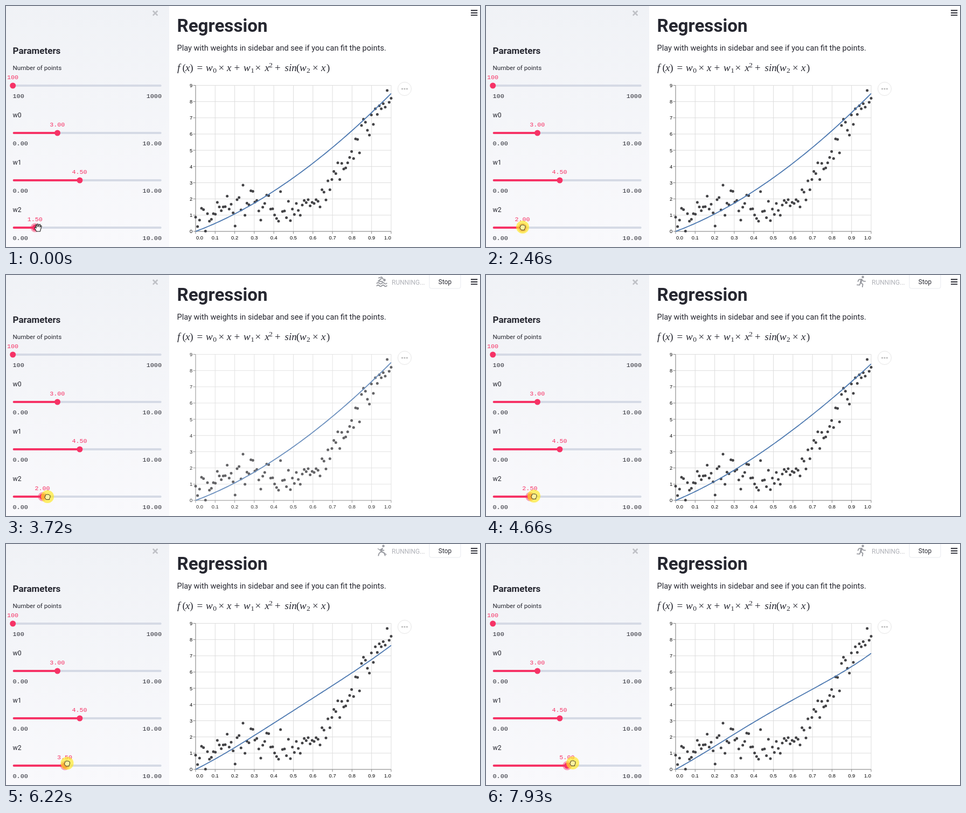
These frames come from a looping animation (880x448 px, 8000 ms). An HTML page:

```html
<!DOCTYPE html>
<html lang="en">
<head>
<meta charset="utf-8">
<title>Regression</title>
<style>
  html, body { margin: 0; width: 100%; height: 100%; overflow: hidden; background: #fff; }
  svg { display: block; width: 880px; height: 448px; }
  text { font-family: Roboto, sans-serif; fill: #262730; }
  .mono { font: 11.8px "Liberation Mono", monospace; }
  .value { font: 11.7px "Liberation Mono", monospace; fill: #f63366; text-anchor: middle; }
  .axis text { font: 9.4px "Liberation Sans", sans-serif; fill: #000; }
  .math text { font: italic 19px "Liberation Serif", serif; }
  .math .up { font-style: normal; }
  .math .small { font: 13.5px "Liberation Serif", serif; }
  .icon { fill: none; stroke: #999ba1; stroke-width: 1.9; stroke-linecap: round; stroke-linejoin: round; }
  .icon .head { fill: #999ba1; stroke: none; }
</style>
</head>
<body>
<svg id="stage" viewBox="0 0 880 448" xmlns="http://www.w3.org/2000/svg">
  <defs>
    <linearGradient id="side" x2="0" y2="1">
      <stop offset="0" stop-color="#f0f2f6"/>
      <stop offset="1" stop-color="#f9f9fc"/>
    </linearGradient>
  </defs>
  <rect width="880" height="448" fill="#fff"/>
  <rect width="303" height="448" fill="url(#side)"/>
  <path d="M272.8 9l8.6 8.6M281.4 9l-8.6 8.6" stroke="#bfc1c6" stroke-width="2.6"/>
  <text x="12.5" y="89" font-size="17" font-weight="700">Parameters</text>

  <text x="317.5" y="47.5" font-size="33.2" font-weight="700">Regression</text>
  <text x="317.5" y="83.3" font-size="14.57">Play with weights in sidebar and see if you can fit the points.</text>
  <g class="math" id="math"></g>
  <g id="chart">
    <g class="axis" id="axis"></g>
    <g id="dots" fill="#434346"></g>
    <path id="curve" fill="none" stroke="#4c78b0" stroke-width="1.8"/>
  </g>
  <circle cx="740" cy="154" r="12.5" fill="#fff" stroke="#e6e6e6"/>
  <g fill="#bbb"><circle cx="735.6" cy="154" r="1.6"/><circle cx="740" cy="154" r="1.6"/><circle cx="744.4" cy="154" r="1.6"/></g>
  <path d="M863 8.3h12.3M863 12.7h12.3M863 17.1h12.3" stroke="#262730" stroke-width="1.9"/>

  <g id="status">
    <g class="icon" id="run">
      <circle class="head" cx="699.6" cy="3.8" r="2.3"/>
      <path d="M697.5 8L695.6 14.2L699.6 17.3L698.8 22M695.2 14.6L693.6 18.6L689 18.4M690.6 11.8L692.4 8.4L697.5 8L700.4 11.4L704 11.8"/>
      <path d="M697 9L695.8 13.6" stroke-width="3.4"/>
    </g>
    <g class="icon" id="bike">
      <circle cx="691.6" cy="17.6" r="3.6"/><circle cx="703" cy="17.6" r="3.6"/>
      <circle class="head" cx="700.6" cy="4" r="2.2"/>
      <path d="M703.5 11H700L697.5 7.6L693.5 11.2L697.5 14V18.4"/>
    </g>
    <g class="icon" id="row">
      <circle class="head" cx="700.6" cy="3.8" r="2.3"/>
      <path d="M699 8.2L696 14.4L701.8 16.2L703.8 21.4M696 14.4L692.6 17.6L691.4 21.6M699 8.4L694.2 11L701.4 11.8"/>
      <path d="M690.5 8.8L706 19.6" stroke-width="1.4"/>
    </g>
    <g class="icon" id="swim">
      <circle class="head" cx="702.6" cy="9.4" r="2.3"/>
      <path d="M692 5.4L697.4 3.8L700 7.4M697 6.4L691 11.4L699 12.2" />
      <path id="wave" d="M688.5 15.4q2.3 -2.4 4.6 0t4.6 0t4.6 0t4.6 0M688.5 20q2.3 -2.4 4.6 0t4.6 0t4.6 0t4.6 0"/>
    </g>
    <text x="716" y="18" font-size="12" style="fill:#b1b3b9">RUNNING...</text>
    <path d="M786 0V21.5q0 3.5 3.5 3.5H840.5q3.5 0 3.5 -3.5V0" fill="#fff" stroke="#e8eaef"/>
    <text x="815" y="17" font-size="11.9" text-anchor="middle">Stop</text>
  </g>

  <g id="sliders"></g>
  <g id="pointer">
    <circle id="glow" r="12" fill="#ffe81f" opacity=".66"/>
    <path id="open" fill="#fff" stroke="#1c1c1c" stroke-width="1.1" stroke-linejoin="round"
      d="M-3 7L-6 1.5Q-7 -.5 -5.3 -.8Q-4 -.6 -3.2 1L-4.6 -4Q-4.6 -5.8 -3.1 -5.4L-1.5 -1.4L-1.6 -6Q-1 -7.7 .4 -6.3L1 -1.6L2.3 -5.8Q3.8 -6.8 4.4 -5.2L3.6 -.8L5.2 -3.4Q6.8 -3.8 6.6 -2.2L4.6 4.2L4 7Z"/>
    <path id="fist" fill="#fff3a0" stroke="#33301c" stroke-width="1" stroke-linejoin="round"
      d="M-2.6 5.4L-5 1.6Q-5.6 -.4 -3.9 -.6L-3.9 -2.8Q-3.2 -4.6 -1.6 -3.6Q-.4 -5 1 -3.7Q2.6 -4.6 3.5 -2.9Q5.2 -3 5 -1.2L4.8 1.6L3.6 3.6V5.4Z"/>
  </g>
</svg>
<script>
const LOOP = 8000, LEFT = 352, RIGHT = 715, BASE = 419, TOP = 147.5;
const X0 = 12.7, TRACK = 276;
const $ = id => document.getElementById(id);
const px = x => LEFT + (RIGHT - LEFT) * x;
const py = y => BASE - (BASE - TOP) / 9 * y;

function add(parent, tag, attrs, text) {
  const el = document.createElementNS("http://www.w3.org/2000/svg", tag);
  for (const k in attrs) el.setAttribute(k, attrs[k]);
  if (text !== undefined) el.textContent = text;
  return parent.appendChild(el);
}

// Formula
[[318, "f"], [333, "x"], [371, "w"], [410, "x"], [441, "w"], [480.5, "x"],
 [517.5, "sin"], [545, "w"], [585, "x"]].forEach(([x, s]) => add($("math"), "text", { x, y: 121.3 }, s));
[[327.5, "("], [341.3, ")"], [354.5, "="], [394.5, "×"], [423.5, "+"], [462.5, "×"],
 [499, "+"], [539, "("], [569, "×"], [595, ")"]].forEach(([x, s]) => add($("math"), "text", { x, y: 121.3, class: "up" }, s));
[[384.3, 124, "0"], [454.3, 124, "1"], [488.3, 113.5, "2"], [558, 124, "2"]]
  .forEach(([x, y, s]) => add($("math"), "text", { x, y, class: "small" }, s));

// Chart
const axis = $("axis");
let grid = "", ticks = "";
for (let i = 0; i <= 10; i++) {
  const x = px(i / 10);
  grid += `M${x} ${TOP}V${BASE}`;
  ticks += `M${x} ${BASE}v4.5`;
  const end = i === 0 ? "start" : i === 10 ? "end" : "middle";
  add(axis, "text", { x: i ? x : x + 1, y: 433.5, "text-anchor": end }, (i / 10).toFixed(1));
}
for (let i = 0; i <= 9; i++) {
  const y = py(i);
  grid += `M${LEFT} ${y}H${RIGHT}`;
  ticks += `M${LEFT} ${y}h-4.5`;
  add(axis, "text", { x: 346.3, y: y + 3.4, "text-anchor": "end" }, i);
}
add(axis, "path", { d: grid, stroke: "#ddd" });
add(axis, "path", { d: `${ticks}M${LEFT} ${TOP}V${BASE}H${RIGHT}`, stroke: "#888", fill: "none" });

const ys = [392.5, 410, 398, 376, 378.5, 418.5, 386, 400, 396.5, 386, 387, 365, 373.5, 380.5, 373.5, 373, 353.5, 377.5, 368.5, 384.5,
  409, 360, 356, 379, 333, 389, 366.5, 369.5, 343.5, 344.5, 364.5, 361.5, 381, 398, 374, 367, 351.5, 352.5, 377.5, 377,
  388.5, 395, 400, 345, 382, 381, 393.5, 363, 399, 377.5, 387.5, 367, 380, 389, 370, 361.5, 365.5, 360, 371.5, 365,
  367, 360, 363, 373.5, 341.5, 346, 360.5, 325, 341.5, 322.5, 307.5, 311.5, 291.5, 322.5, 292.5, 303, 301, 291.5, 281.5, 270.5,
  283.5, 247, 248, 273, 222, 210.5, 216, 231, 240, 202.5, 220, 191, 201.5, 185.5, 191, 181.5, 188, 157, 179, 171.5];
ys.forEach((cy, i) => add($("dots"), "circle", { cx: px(i / 99), cy, r: 2.5 }));

function curve(w2) {
  let d = "";
  for (let i = 0; i < 100; i++) {
    const x = i / 99;
    d += (i ? "L" : "M") + px(x).toFixed(2) + " " + py(3 * x + 4.5 * x * x + Math.sin(w2 * x)).toFixed(2);
  }
  return d;
}

// Sliders
function slider(row, name, min, max, size) {
  const y = 148 + 88 * row, g = $("sliders");
  add(g, "text", { x: 12.5, y: y - 29, "font-size": size }, name);
  add(g, "text", { x: 12.5, y: y + 23, class: "mono" }, min);
  add(g, "text", { x: 289, y: y + 23, class: "mono", "text-anchor": "end" }, max);
  add(g, "rect", { x: X0, y: y - 2, width: TRACK, height: 4, rx: 2, fill: "#d5dae5" });
  const bar = add(g, "rect", { x: X0, y: y - 2, height: 4, rx: 2, fill: "#f63366" });
  const halo = add(g, "circle", { cy: y, r: 8.6, fill: "#f63366", opacity: 0 });
  const knob = add(g, "circle", { cy: y, r: 5.5, fill: "#f63366" });
  const label = add(g, "text", { y: y - 12, class: "value" });
  return (part, text, glow = 0) => {
    const x = X0 + TRACK * part;
    bar.setAttribute("width", x - X0);
    [halo, knob].forEach(c => c.setAttribute("cx", x));
    halo.setAttribute("opacity", glow);
    label.setAttribute("x", x - .3);
    label.textContent = text;
  };
}
slider(0, "Number of points", "100", "1000", 11.7)(0, "100");
slider(1, "w0", "0.00", "10.00", 12.3)(.3, "3.00");
slider(2, "w1", "0.00", "10.00", 12.3)(.45, "4.50");
const setW2 = slider(3, "w2", "0.00", "10.00", 12.3);

// Timelines: [time, value...]
const values = [[0, 1.5], [2460, 2], [3900, 2.5], [5140, 3], [6160, 3.5], [7630, 4.5], [7850, 5]];
const fits = [[0, 1.5], [3960, 2], [5210, 2.5], [6180, 3], [7690, 3.5]];
const fades = [[3170, 3960], [4560, 5210], [5920, 6180], [6910, 7690]];
const path = [[0, 59.5, 412], [120, 58, 411.5], [220, 56, 411], [430, 55, 410.5], [980, 55, 410], [1130, 57, 410], [1440, 57, 410],
  [1460, 59.5, 410], [1620, 62, 410], [1750, 62, 410], [1830, 65, 410], [1990, 65, 410], [2010, 66, 410], [2440, 66, 410],
  [2460, 68, 411], [3170, 68, 411], [3720, 77, 412], [3960, 84, 412], [4330, 87, 411], [4660, 89, 411], [5210, 98, 410],
  [5860, 98, 410], [6220, 113.5, 407.5], [6680, 119, 407], [7070, 119.5, 407], [7690, 148, 407], [7930, 161, 407]];

const step = (list, t) => list.filter(k => k[0] <= t).pop()[1];
function along(t) {
  const i = path.findIndex(k => k[0] > t);
  if (i < 0) return path[path.length - 1].slice(1);
  const a = path[i - 1], b = path[i], p = (t - a[0]) / (b[0] - a[0]);
  return [1, 2].map(n => a[n] + (b[n] - a[n]) * p);
}
const show = (id, on) => $(id).setAttribute("visibility", on ? "visible" : "hidden");

let lastFit;
function draw(t) {
  const w2 = step(values, t), fit = step(fits, t), held = t >= 980;
  setW2(w2 / 10, w2.toFixed(2), .45);

  if (fit !== lastFit) $("curve").setAttribute("d", curve(lastFit = fit));
  const fade = fades.find(([a, b]) => t >= a && t < b);
  $("chart").setAttribute("opacity", fade ? 1 - .6 * ((t - fade[0]) / 1000) ** 2 : 1);

  const [x, y] = along(t);
  $("pointer").setAttribute("transform", `translate(${x.toFixed(2)} ${y.toFixed(2)})`);
  show("glow", held);
  show("fist", held);
  show("open", !held);

  const busy = t >= 2780, ph = (t - 2780) % 640;
  const pose = ph < 100 ? "run" : ph < 180 ? "bike" : ph < 270 ? "row" : ph < 380 ? "swim" : "run";
  $("status").setAttribute("display", busy ? "inline" : "none");
  ["run", "bike", "row", "swim"].forEach(id => $(id).setAttribute("display", id === pose ? "inline" : "none"));
}

const start = performance.now();
function tick() {
  draw((performance.now() - start) % LOOP);
  requestAnimationFrame(tick);
}
tick();
</script>
</body>
</html>
```
